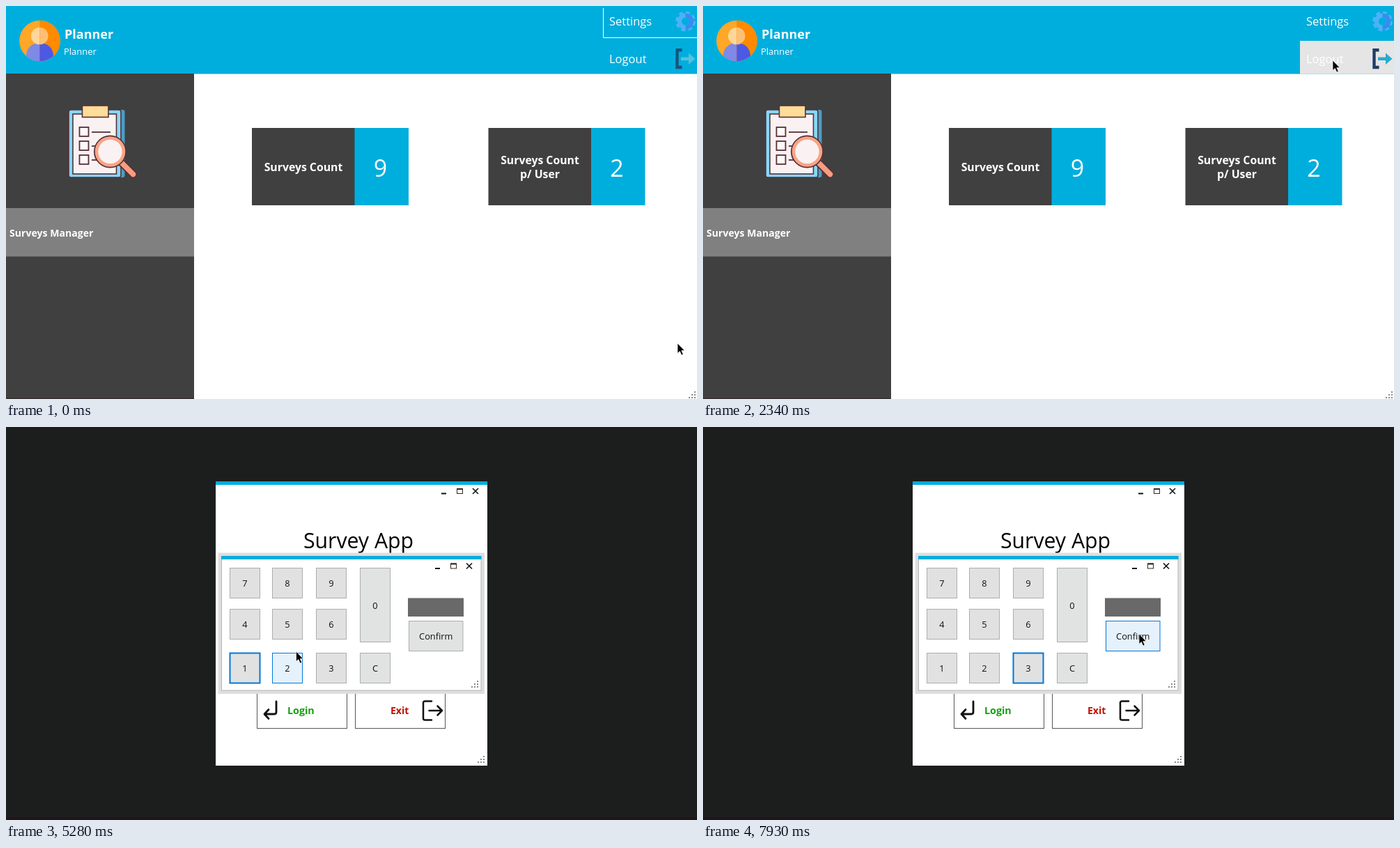
Animation of 992 by 564 pixels, one loop 8 s. Source, as an HTML page:

```html
<!DOCTYPE html>
<html lang="en">
<head>
<meta charset="utf-8">
<title>Survey App</title>
<style>
html, body { margin: 0; width: 100%; height: 100%; overflow: hidden; background: #1c1e1d; }
svg { display: block; width: 100vw; height: 100vh; }
text { font-family: "Open Sans", "Noto Sans", sans-serif; white-space: pre; }
</style>
</head>
<body>
<svg id="stage" viewBox="0 0 992 564"></svg>
<script>
const LOOP = 8000;
const CYAN = '#00aedd', DARK = '#404040', BLUE = '#0078d7', INK = '#553035';
const stage = document.getElementById('stage');

const rect = (x, y, w, h, fill, extra = '') =>
  `<rect x="${x}" y="${y}" width="${w}" height="${h}" fill="${fill}" ${extra}/>`;
const box = (x, y, w, h, fill, stroke, extra = '') =>
  rect(x + .5, y + .5, w - 1, h - 1, fill, `stroke="${stroke}" ${extra}`);
const path = (d, stroke, width, extra = '') =>
  `<path d="${d}" fill="none" stroke="${stroke}" stroke-width="${width}" ${extra}/>`;
const circle = (x, y, r, fill, extra = '') =>
  `<circle cx="${x}" cy="${y}" r="${r}" fill="${fill}" ${extra}/>`;
const text = (x, y, size, str, fill, extra = '') =>
  `<text x="${x}" y="${y}" font-size="${size}" fill="${fill}" ${extra}>${str}</text>`;
const group = (id, body, extra = '') => `<g id="${id}" ${extra}>${body}</g>`;
const BOLD = 'font-weight="700"', MID = 'text-anchor="middle"';

// Resize grip whose lower right dot sits at x, y.
function grip(x, y) {
  let dots = '';
  for (let row = 0; row < 3; row++)
    for (let col = 0; col <= row; col++)
      dots += rect(x - 4 * col, y - 4 * (2 - row), 2, 2, '#8a8a8a');
  return dots;
}

// Minimise, maximise and close; x, y is the middle of the cross.
const controls = (x, y) =>
  rect(x - 49, y + 2.5, 7, 2, '#111') +
  box(x - 27, y - 4, 9, 8, 'none', '#33291c') + rect(x - 27, y - 4, 9, 2, '#33291c') +
  path(`M${x - 4} ${y - 4}l8 8m0 -8l-8 8`, '#111', 1.6);

function card(x, lines, count) {
  const first = 236.5 - (lines.length - 1) * 10;
  return rect(x, 175, 148, 111, DARK) + rect(x + 147.5, 175, 77.5, 111, CYAN) +
    lines.map((s, i) => text(x + 74, first + 20 * i, 15.8, s, '#fff', `${BOLD} ${MID}`)).join('') +
    text(x + 184.5, 245, 34, count, '#fff', `${MID} font-weight="500"`);
}

const avatar =
  '<clipPath id="disc"><circle cx="48.5" cy="50" r="29.3"/></clipPath>' +
  '<clipPath id="rightHalf"><rect x="48.3" y="20" width="31" height="60"/></clipPath>' +
  '<g clip-path="url(#disc)">' +
  [['#ffa726', '#ffd699', '#7f89e6', ''], ['#ff8a00', '#ffbf73', '#4d59e3', 'clip-path="url(#rightHalf)"']]
    .map(([back, head, body, clip]) => `<g ${clip}>` + rect(18, 20, 62, 60, back) +
      `<path d="M29 80V70Q31 54 48.5 53Q66 54 68 70V80Z" fill="${body}"/>` +
      circle(48.3, 43, 12.3, head) + '</g>').join('') + '</g>';

const clipboard =
  rect(98, 149, 72.5, 97, '#4d9dc4', 'rx="3"') +
  rect(90, 149, 75, 97, '#86d7fb', `rx="3" stroke="${INK}" stroke-width="1.6"`) +
  rect(96, 155, 62.5, 86, '#faf1f2', `stroke="${INK}" stroke-width="1.6"`) +
  rect(109.5, 143, 37.5, 16.5, '#ffdc97', `stroke="${INK}" stroke-width="1.6"`) +
  [174, 194, 214].map((y, i) =>
    rect(105.5, y, 13, 13, '#fff8f6', `stroke="${INK}" stroke-width="1.8"`) +
    path(`M123 ${y + 7}H${[150, 130, 134][i]}`, INK, 1.8)).join('') +
  path('M166 225L182.500 241.500', INK, 11, 'stroke-linecap="round"') +
  path('M166 225L182.500 241.500', '#f79c80', 7.5, 'stroke-linecap="round"') +
  circle(149.500, 209, 19.5, '#faf1f2', `stroke="${INK}" stroke-width="8"`) +
  circle(149.5, 209, 19.5, '#faf1f2', 'stroke="#f9a486" stroke-width="4.6"');

const gear = group('gear',
  circle(975.5, 22, 12, 'none', 'stroke="#62b4ff" stroke-width="5" stroke-dasharray="5.6 3.825"') +
  circle(975.5, 22, 8.6, 'none', 'stroke="#62b4ff" stroke-width="6"') +
  path('M975.5 13.400A8.600 8.600 0 0 1 975.500 30.600', '#4a83f5', 6));

const exitIcon =
  path('M970.5 63.300H963.500V88H970.500', '#1d3f68', 4.4) +
  '<path id="exitArrow" d="M969 73.500H980V67.500L989.500 75.700L980 84V78H969Z"/>';

const mainWindow = group('main',
  rect(0, 0, 992, 564, '#fff') + rect(0, 0, 992, 97.5, CYAN) +
  rect(0, 97, 270, 467, DARK) + rect(0, 290, 270, 69.500, '#808080') + rect(0, 562.5, 270, 1.5, '#38302f') +
  avatar + clipboard +
  text(84, 46.5, 18, 'Planner', '#fff', BOLD) + text(83, 70, 13, 'Planner', '#fff') +
  text(5, 330.5, 14.1, 'Surveys Manager', '#fff', BOLD) +
  card(353, ['Surveys Count'], 9) + card(692.5, ['Surveys Count', 'p/ User'], 2) +
  group('focusLine', path('M857.5 3V45.500H992', '#fff', 1)) +
  rect(857, 3, 135, 43.5, '#e5e5e5', 'id="hotSettings"') +
  rect(857, 50, 135, 47.5, '#e5e5e5', 'id="hotLogout"') +
  text(866, 28, 16.5, 'Settings', '#fff') + text(866, 82, 16.5, 'Logout', '#fff') +
  gear + group('exitIcon', exitIcon) + grip(988, 561));

const settingsDialog = group('dialog',
  rect(280, 71, 431.5, 421.5, '#000', 'opacity=".13"') +
  rect(284.5, 75, 422, 413.5, '#fff', 'stroke="#b8b8b8"') + rect(284, 75, 423, 5, CYAN) +
  text(309, 118, 19.3, 'Settings', '#2d3a46') +
  box(306, 182, 379.5, 27, '#fff', BLUE) + rect(308.5, 184.5, 125, 20, BLUE) +
  text(309, 200, 14, 'planner@mail.test', '#fff') +
  box(306, 249, 242, 27, '#fff', '#777') +
  path('M547 318.500H306.500V344.500H547', '#c8c8c8', 1) + grip(701, 483));

const login = group('login',
  rect(301, 78, 390, 408, '#fff') + rect(301, 78, 390, 5, CYAN) +
  controls(674, 92) + grip(685, 480) +
  text(506, 174, 30.2, 'Survey App', '#000', MID) +
  circle(375, 234.500, 6.8, 'none', 'stroke="#111" stroke-width="1.8"') +
  path('M363 256.500Q363 245 375 245Q387 245 387 256.500Z', '#111', 1.8, 'stroke-linejoin="round"') +
  box(389, 228, 242, 30.5, '#fff', BLUE) +
  text(393, 249, 15.8, '', '#000', 'id="userName"') + rect(411, 232, 1.2, 21.5, '#000', 'id="caret"') +
  rect(364.7, 292.7, 20.8, 19.6, 'none', 'rx="2.5" stroke="#111" stroke-width="2"') +
  path('M369 292V290.500A6 5.800 0 0 1 381 290.500V292', '#111', 2) +
  circle(375, 301, 2.2, '#111') + path('M375 301V307', '#111', 1.8) +
  box(389, 284, 199, 30, '#efefef', '#ccc') + rect(391, 287, 74.5, 23, '#fff') +
  text(393, 305, 15.8, 'Password', '#6d6d6d') + box(587, 284, 44, 30, '#f00', '#7a0000') +
  box(513, 324, 12, 12, '#fff', '#222') + text(531, 335, 12.6, 'Show Password', '#111') +
  box(360, 380, 130, 53, '#fff', '#555') + box(501, 380, 130, 53, '#fff', '#555') +
  path('M388 394V409Q388 412 385 412H371.500M377 405.500L371 412L377 418.500', '#111', 2.8, 'stroke-linecap="round" stroke-linejoin="round"') +
  text(404, 412, 14.3, 'Login', '#13a10e', BOLD) + text(552, 412, 14, 'Exit', '#c01000', BOLD) +
  path('M611 393.500H601.500Q599 393.500 599 396V418Q599 420.500 601.500 420.500H611M607.500 407H626M619.500 400.500L626 407L619.500 413.500', '#111', 2.5, 'stroke-linecap="round" stroke-linejoin="round"'));

const COLS = [321, 382, 445, 508], ROWS = [202, 261, 324];
const keys = [...'789456123'].map((label, i) =>
  ({ label, x: COLS[i % 3], y: ROWS[Math.floor(i / 3)], w: 44, h: 44, fill: '#e1e1e1' }));
keys.push(
  { label: '0', x: COLS[3], y: ROWS[0], w: 44, h: 107, fill: '#e0e3e2' },
  { label: 'C', x: COLS[3], y: ROWS[2], w: 44, h: 44, fill: '#e0e3e2' },
  { label: 'Confirm', x: 578, y: 278, w: 78.5, h: 44, fill: '#e0e3e2' });

const keypad = group('keypad',
  rect(304.5, 180.5, 382.5, 202.5, '#dedede') +
  rect(309.5, 185.5, 372.5, 192.5, '#fff', 'stroke="#b4b4b4"') + rect(309, 185, 373.500, 5, CYAN) +
  controls(665, 199.5) + grip(676, 372) + rect(577, 245.5, 80, 26.5, '#696969') +
  keys.map(k => box(k.x, k.y, k.w, k.h, k.fill, '#adadad', `id="key${k.label}"`) +
    text(k.x + k.w / 2, k.y + k.h / 2 + 5, 12.8, k.label, '#111', MID)).join(''));

const pointers =
  group('arrow', '<path d="M0 0V14.500L3.300 11.500L5.800 17L8.200 16L5.800 10.600H10.200Z" fill="#000" stroke="#fff" stroke-width=".7"/>') +
  group('beam', path('M-3.500 -8.500H3.500M0 -8.500V8.500M-3.500 8.500H3.500', '#222', 1.1));

stage.innerHTML = rect(0, 0, 992, 564, '#1c1e1d') + rect(0, 560, 992, 4, '#21151b') +
  mainWindow + settingsDialog + login + keypad + pointers;

const el = id => document.getElementById(id);
const show = (id, on) => el(id).setAttribute('visibility', on ? 'visible' : 'hidden');

// Pointer way points: time, x, y.
const ROUTE = [
  [70, 964, 484], [330, 920, 205], [420, 909, 125], [490, 887, 42], [560, 880, 30],
  [700, 878, 34], [830, 871, 57], [890, 868, 60], [1400, 700, 92], [1670, 689, 92],
  [1800, 689, 92], [2250, 895, 72], [2340, 904, 78], [2500, 904, 78], [2640, 720, 152],
  [2800, 550, 235], [2970, 516, 246], [3110, 516, 246], [3170, 496, 246], [4380, 496, 246],
  [4650, 606, 300], [4850, 606, 300], [5140, 460, 312], [5280, 417, 322], [5420, 345, 340],
  [5530, 345, 342], [5650, 400, 345], [5740, 402, 345], [5900, 465, 345], [5970, 468, 345],
  [6110, 535, 338], [6260, 535, 338], [6540, 430, 348], [6680, 373, 345], [6740, 345, 343],
  [6860, 345, 343], [7020, 400, 345], [7130, 402, 345], [7320, 464, 340], [7480, 466, 338],
  [7850, 609, 311], [7930, 626, 297]];
const TYPED = [[0, ''], [3440, 'a'], [3510, 'ad'], [3580, 'adm'], [3720, 'admi'], [3850, 'admin']];
const FOCUS = [[0, '1'], [5700, '2'], [5940, '3'], [6190, 'C'], [6800, '1'], [7090, '2'], [7400, '3']];

const valueAt = (steps, t) => steps.filter(s => s[0] <= t).pop()[1];

function pointerAt(t) {
  const next = ROUTE.findIndex(p => p[0] > t);
  if (next === 0) return ROUTE[0].slice(1);
  if (next < 0) return ROUTE[ROUTE.length - 1].slice(1);
  const [t0, x0, y0] = ROUTE[next - 1], [t1, x1, y1] = ROUTE[next];
  const k = (t - t0) / (t1 - t0);
  return [x0 + (x1 - x0) * k, y0 + (y1 - y0) * k];
}

function render(t) {
  const [x, y] = pointerAt(t);
  const inMain = t < 2500, inLogin = t >= 2570, padOpen = t >= 5210;
  const dialogOpen = t >= 700 && t < 1830;
  const hotSettings = t >= 490 && t < 900;
  const hotLogout = inMain && t > 1830 && x > 857 && y > 50;

  show('main', inMain);
  show('dialog', dialogOpen);
  show('login', inLogin);
  show('keypad', padOpen);
  for (const [id, on] of [['focusLine', t < 490], ['hotSettings', hotSettings], ['hotLogout', hotLogout]])
    el(id).setAttribute('opacity', on ? 1 : 0);
  el('gear').setAttribute('opacity', hotSettings ? 1 : .78);
  el('exitIcon').setAttribute('opacity', hotLogout ? 1 : .8);
  el('exitArrow').setAttribute('fill', hotLogout ? '#27aacf' : '#6cc5de');

  const name = el('userName');
  name.textContent = valueAt(TYPED, t);
  const blinkOn = t < 3850 || Math.floor((t - 3850) / 530) % 2 === 0;
  el('caret').setAttribute('x', 393 + (name.textContent ? name.getComputedTextLength() : 0));
  el('caret').setAttribute('opacity', t >= 2970 && blinkOn ? 1 : 0);

  const focused = valueAt(FOCUS, t);
  for (const k of keys) {
    const hot = x >= k.x - 3 && x <= k.x + k.w + 3 && y >= k.y - 3 && y <= k.y + k.h + 3;
    const focus = k.label === focused;
    const key = el('key' + k.label);
    key.setAttribute('fill', hot ? '#e5f1fb' : k.fill);
    key.setAttribute('stroke', hot || focus ? BLUE : '#adadad');
    key.setAttribute('stroke-width', focus && !hot ? 2 : 1);
  }

  const away = t >= 3370 && t < 4380;
  const overField = inLogin && !padOpen && x > 390 && x < 630 && y > 229 && y < 258;
  show('arrow', !away && !overField);
  show('beam', !away && overField);
  for (const id of ['arrow', 'beam'])
    el(id).setAttribute('transform', `translate(${x.toFixed(1)} ${y.toFixed(1)})`);
}

const start = performance.now();
function tick() {
  render((performance.now() - start) % LOOP);
  requestAnimationFrame(tick);
}
tick();
</script>
</body>
</html>
```
